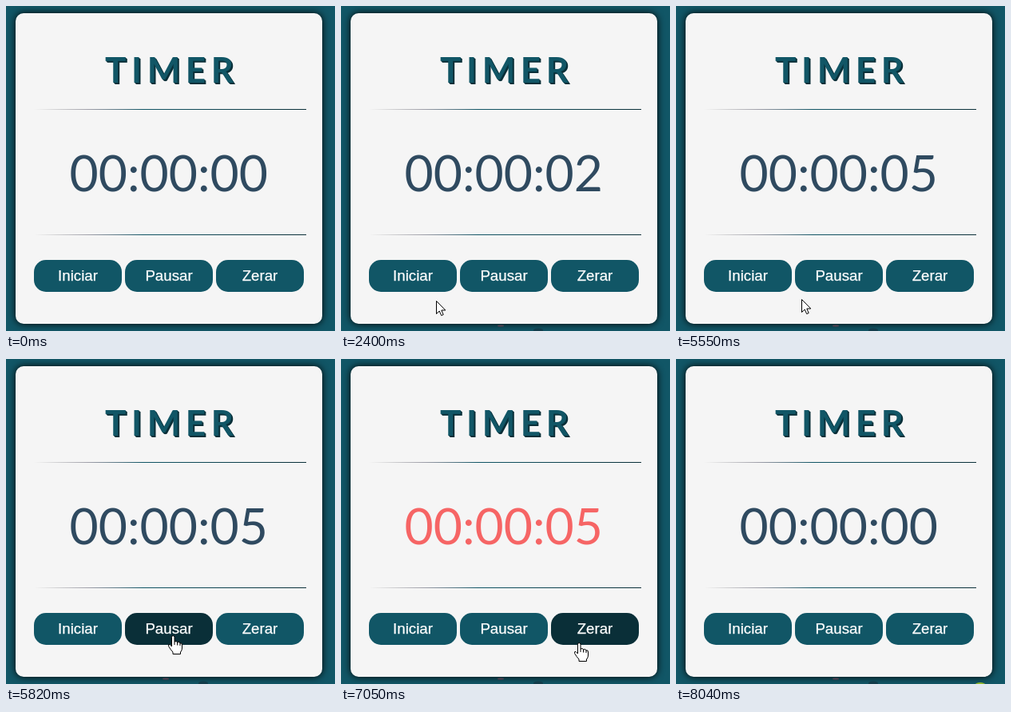
These frames come from a looping animation (412 px wide and 407 px high, 8140 ms). An HTML page:

```html
<!DOCTYPE html>
<html lang="pt-BR">
<head>
<meta charset="utf-8">
<title>Timer</title>
<style>
  html, body { margin: 0; width: 100%; height: 100%; overflow: hidden; background: #115666; }
  .card { position: absolute; left: 12px; top: 9px; width: 384px; height: 389px; border-radius: 10px;
    background: #f5f5f5; box-shadow: 0 0 10px #000; }
  svg { position: absolute; left: 0; top: 0; }
  .title { font: bold 44px Lato, sans-serif; letter-spacing: 6.6px; }
  .clock { font: 62.4px Lato, sans-serif; text-anchor: middle; }
  .button { fill: #115666; }
  .button.hover { fill: #0a2f38; }
  .label { font: 18.7px "Liberation Sans", Arial, sans-serif; text-anchor: middle; fill: #fff;
    stroke: #fff; stroke-width: .25; }
  .cursor { fill: #fff; stroke: #000; stroke-linejoin: round; }
</style>
</head>
<body>
<div class="card"></div>
<svg width="412" height="407" viewBox="0 0 412 407">
  <defs>
    <linearGradient id="rule">
      <stop offset="0" stop-color="#666" stop-opacity="0"/>
      <stop offset=".2" stop-color="#667" stop-opacity=".6"/>
      <stop offset=".4" stop-color="#115666"/>
      <stop offset="1" stop-color="#0a2f38"/>
    </linearGradient>
  </defs>
  <g class="title">
    <text x="126" y="98" fill="#0a2f38">TIMER</text>
    <text x="125" y="97" fill="#0a2f38">TIMER</text>
    <text x="124" y="96" fill="#115666">TIMER</text>
  </g>
  <rect x="35" y="129" width="341" height="1" fill="url(#rule)"/>
  <rect x="35" y="286" width="341" height="1" fill="url(#rule)"/>
  <text class="clock" id="clock" x="203.7" y="232"></text>
  <g id="buttons"></g>
  <g id="specks">
    <ellipse cx="200" cy="400.5" rx="4" ry="1.2" fill="#4a3f4e"/>
    <ellipse cx="247" cy="406" rx="6" ry="2.5" fill="#123c4b"/>
  </g>
  <ellipse id="greenSpeck" cx="381" cy="408" rx="6.5" ry="3" fill="#8fb52c"/>
  <path class="cursor" id="arrow" d="M.5 .5V16.5L4.2 13L6.7 18.6L9.2 17.5L6.8 12H11.8Z"/>
  <path class="cursor" id="hand" d="M-1.5 13V1.5Q-1.5 -.5 .2 -.5T2 1.5V7Q5 5.5 5.5 8Q8.5 6.5 9 9Q11.5 8 11.5 11V15Q11.5 18 9.5 20V22.5H0V20Q-3 17 -5.5 12.5Q-6 10 -4 10.5Z M2 7V11M5.5 8V11.5M9 9V12"/>
</svg>
<script>
const LOOP = 8140;
const TICKS = [1430, 2400, 3400, 4370, 5360];
const PAUSE = 5830, RESET = 7450;
const ENTER = 70, LEAVE = 7870;

// Pointer tip: time, x, y
const PATH = [
  [70, 243, 404], [160, 196, 392], [270, 122, 352], [330, 108, 344], [430, 108, 346], [530, 119, 369],
  [5400, 119, 369], [5550, 157, 367], [5680, 195, 350], [5760, 207, 346], [5850, 210, 347], [6030, 233, 377],
  [6900, 233, 377], [7050, 298, 356], [7150, 314, 347],
  [7470, 315, 348], [7660, 334, 372], [7870, 358, 408]
];

const $ = id => document.getElementById(id);
const buttons = ["Iniciar", "Pausar", "Zerar"].map((text, i) => {
  const x = 35 + 114 * i;
  $("buttons").insertAdjacentHTML("beforeend",
    `<rect class="button" x="${x}" y="318" width="110" height="40" rx="15"/>
     <text class="label" x="${x + 55}" y="344">${text}</text>`);
  return { x, rect: $("buttons").querySelectorAll("rect")[i] };
});

function pointerAt(t) {
  const i = PATH.findIndex(point => point[0] > t);
  if (i < 1) return PATH[i ? PATH.length - 1 : 0].slice(1);
  const [t0, x0, y0] = PATH[i - 1], [t1, x1, y1] = PATH[i];
  const k = (t - t0) / (t1 - t0);
  return [x0 + (x1 - x0) * k, y0 + (y1 - y0) * k].map(Math.round);
}

const show = (element, visible) => element.setAttribute("visibility", visible ? "visible" : "hidden");

function draw(t) {
  const seconds = t < RESET ? TICKS.filter(tick => tick <= t).length : 0;
  $("clock").textContent = `00:00:0${seconds}`;
  $("clock").setAttribute("fill", t >= PAUSE && t < RESET ? "#f66565" : "#2f4a60");

  const [x, y] = pointerAt(t);
  const present = t >= ENTER && t < LEAVE;
  let hovering = false;
  for (const { x: left, rect } of buttons) {
    const over = present && x >= left && x < left + 110 && y >= 318 && y < 358;
    rect.classList.toggle("hover", over);
    hovering ||= over;
  }
  for (const [id, active] of [["arrow", !hovering], ["hand", hovering]]) {
    $(id).setAttribute("transform", `translate(${x} ${y})`);
    show($(id), present && active);
  }
  show($("specks"), t >= 200);
  show($("greenSpeck"), t >= 8040);
}

const start = performance.now();
function frame() {
  draw((performance.now() - start) % LOOP);
  requestAnimationFrame(frame);
}
frame();
</script>
</body>
</html>
```
